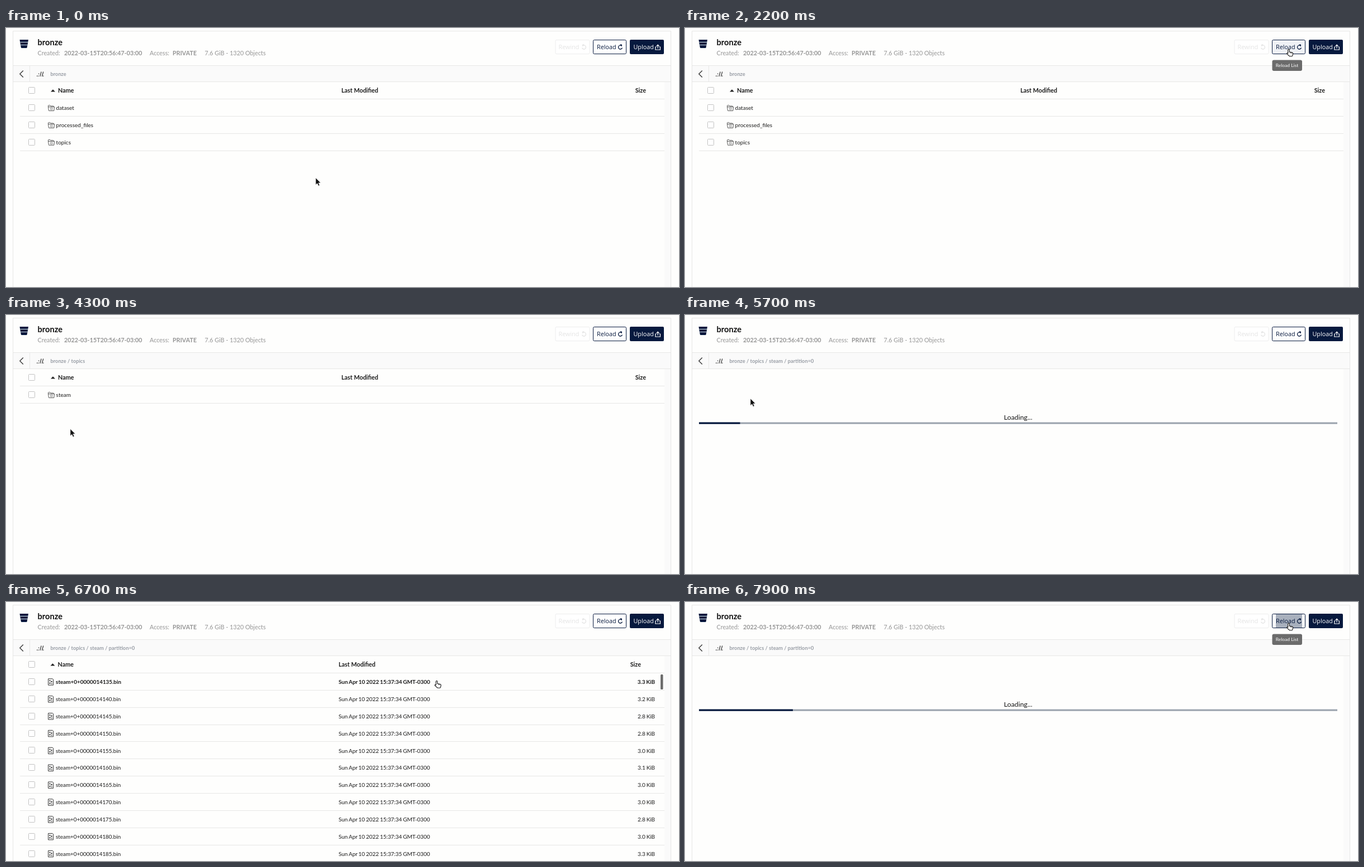
An HTML page for the animation above (8000 ms loop, 1204 by 465 pixels).

```html
<!DOCTYPE html>
<html lang="en">
<head>
<meta charset="utf-8">
<title>Bucket browser</title>
<style>
  html, body { margin: 0; width: 100%; height: 100%; overflow: hidden; background: #fefefd; }
  svg { display: block; width: 1204px; height: 465px; font-family: Lato, sans-serif; }
  .file { letter-spacing: -.008em; word-spacing: -.045em; }
</style>
</head>
<body>
<svg id="stage" viewBox="0 0 1204 465"></svg>
<script>
const LOOP = 8000, TICK = 100, PITCH = 30.86, LIST_TOP = 127.5;
const NAVY = '#07193e', INK = '#1c1c1c', GREY = '#969696', RULE = '#e7e7e6';

// Cursor path: time, x, y
const path = [
  [200, 554, 269], [400, 530.5, 264.5], [500, 530.5, 264.5], [600, 575, 250], [700, 730, 195],
  [800, 950, 120], [900, 1075, 66], [1000, 1075, 66], [1200, 1081, 34], [1300, 1080, 38],
  [2400, 1080, 38], [2700, 760, 100], [3000, 301, 173], [3100, 239.5, 177], [3500, 177, 190],
  [3600, 177, 190], [3800, 115, 204.5], [4300, 115, 204.5], [4800, 117, 150], [6400, 117, 150],
  [6500, 300, 167], [6600, 560, 160], [6700, 770.5, 141.5], [6800, 770.5, 141.5], [7200, 1065, 52],
  [7500, 1080, 38]
];

const root = ['dataset', 'processed_files', 'topics'];
const sizes = [3.3, 3.2, 2.8, 2.8, 3.0, 3.1, 3.0, 3.0, 2.8, 3.0, 3.3];
const files = sizes.map((size, i) => ({
  name: `steam+0+00000${14135 + 5 * i}.bin`,
  date: `Sun Apr 10 2022 15:37:${i < 10 ? 34 : 35} GMT-0300`,
  size: size.toFixed(1) + ' KiB'
}));
const folders = names => names.map(name => ({ name }));
const deep = 'bronze / topics / steam / partition=0';

// Start time, breadcrumb, rows (none while loading), moment loading began
const views = [
  [0, 'bronze', folders(root)],
  [2400, 'bronze', null, 2365],
  [2500, 'bronze', folders(root)],
  [4200, 'bronze / topics', folders(['steam'])],
  [5000, 'bronze / topics / steam', folders(['partition=0'])],
  [5700, deep, null, 5665],
  [5800, deep, files],
  [7900, deep, null, 7820]
];

// Baselines sit on whole pixels
const text = (x, y, size, str, fill = INK, extra = '') =>
  `<text x="${x}" y="${Math.round(y)}" font-size="${size}" fill="${fill}" ${extra}>${str}</text>`;
const rect = (x, y, w, h, fill, extra = '') =>
  `<rect x="${x}" y="${y}" width="${w}" height="${h}" fill="${fill}" ${extra}/>`;
const line = (d, stroke = RULE, width = 1, extra = '') =>
  `<path d="${d}" fill="none" stroke="${stroke}" stroke-width="${width}" ${extra}/>`;
const at = (x, y, content) => `<g transform="translate(${x} ${y})">${content}</g>`;
const BOLD = 'font-weight="700"', END = 'text-anchor="end"', MIDDLE = 'text-anchor="middle"';
const UI = 'font-family="Open Sans, sans-serif"';

const checkbox = y => rect(40.5, Math.floor(y) + .5, 11, 11, '#fff', 'stroke="#c2c2c2" rx="1"');
const turn = stroke => line('M3.4 1A3.5 3.5 0 1 1 1.5-3.2M-.4-4.3H2.3V-1.6', stroke, 1.3);
const folderIcon = line('M1.4 9.8L.5 3V1.3Q.5.5 1.3.5H3.8L5 1.8H9.6Q10.4 1.8 10.4 2.6V3.4M.5 3.4H11.6L10.8 10.3H1.4', '#444', .9) +
  line('M4.4 5.3H8.2V8.4H4.4ZM5.6 6.9H7', '#777', .7);
const fileIcon = line('M.6.6H8.3L9.6 1.9V12H.6Z', '#333', 1) +
  rect(2.4, 3, 2, 2, '#333') + rect(5.4, 4.6, 2.2, 2.2, '#333') + rect(2.4, 7.4, 2.2, 2.2, '#333') +
  rect(6, 8.6, 1.6, 1.6, '#333');
const arrow = '<path d="M0 0V12.6L2.9 9.9L4.9 14.4L7.1 13.5L5.1 9.1H9Z" fill="#111" stroke="#fff" stroke-width=".6"/>';
const hand = '<path d="M-1.3 8V1.3a1.3 1.3 0 0 1 2.6 0V5l5 1q1.5.4 1.4 2L7 11.4q-.3 1.3-1.4 1.3H1.5L-3 8.6q-.8-1 .2-1.5t1.5.9Z" fill="#fff" stroke="#111" stroke-width="1.1"/>' +
  line('M3.3 5.6V7.6M5.4 6V7.8', '#111', .8);

function cursorAt(t) {
  const i = path.findIndex(key => key[0] > t);
  if (i === 0) return path[0].slice(1);
  if (i < 0) return path[path.length - 1].slice(1);
  const [t0, x0, y0] = path[i - 1], [t1, x1, y1] = path[i], k = (t - t0) / (t1 - t0);
  return [x0 + (x1 - x0) * k, y0 + (y1 - y0) * k];
}

function header(crumbs, t, overReload) {
  const pressed = (t >= 2200 && t < 2500) || t === 7700;
  const fill = pressed ? '#eff1f5' : overReload ? '#fafbfc' : '#fff';
  return line('M12.5 465V5.5H1189.5V465') +
    rect(13, 68, 1176, 29, '#fafafa') + rect(1178, 97, 11, 368, '#fafafa') +
    line('M13 67.5H1189M13 96.5H1189M42.5 68V96') +
    `<path d="M24.5 21H40L37.6 35.2Q37.4 36 36.5 36H28Q27.1 36 26.9 35.2Z" fill="${NAVY}"/>` +
    line('M25.5 25.5H39M26.4 30.5H38.2', '#dfe3ea', 1.2) +
    text(56.5, 31, 14.6, 'bronze', '#111', BOLD) +
    text(56.5, 49, 10.8, 'Created:', GREY) +
    text(104, 49, 10.8, '2022-03-15T20:56:47-03:00', GREY, BOLD) +
    text(257, 49, 10.8, 'Access:', GREY) + text(298, 49, 10.8, 'PRIVATE', GREY, BOLD) +
    text(355.5, 49, 10.8, '7.6 GiB - 1320 Objects', GREY) +
    rect(983, 21.5, 61, 25, '#fff', 'stroke="#ededed" rx="2"') +
    text(988.5, 38, 10.8, 'Rewind', '#e4e4e4', UI) +
    at(1034, 34.5, `<g transform="scale(-1 1)">${turn('#e4e4e4')}</g>`) +
    rect(1050.5, 21.5, 59, 25, fill, `stroke="${NAVY}" rx="2"`) +
    (t >= 7800 ? rect(1057, 22, 47, 24, '#a8b0bd') : '') +
    text(1057, 38, 10.8, 'Reload', NAVY, UI) + at(1099, 34.5, turn(NAVY)) +
    rect(1116, 21, 61, 26, NAVY, 'rx="2"') + text(1122.5, 38, 10.8, 'Upload', '#fff', UI) +
    line('M1163.5 34H1161.8V39H1170.4V34H1168.7M1166.1 36.5V30.5M1163.6 32.8L1166.1 30.2L1168.6 32.8', '#fff', 1.2) +
    line('M30.8 76.5L24.8 82.5L30.8 88.5', '#333', 1.3) +
    line('M60.8 87L63.2 78.5M64.4 87L66.8 78.5M57.8 87V85.4M58.6 83V81.4M55.6 87V85.4M66.8 87V85.4', '#444', 1.3) +
    text(79.5, 86, 9.26, crumbs, '#989da5', BOLD);
}

function list(rows, hovered, scrollbar) {
  const isFiles = rows === files, dateX = scrollbar ? 595 : 600, shift = scrollbar ? .5 : 0;
  let out = checkbox(106) +
    `<path d="M${80 - shift} 114.6L${84 - shift} 110.2L${88 - shift} 114.6Z" fill="#222"/>` +
    text(93 - shift, 116, 10.8, 'Name', INK, BOLD) +
    text(dateX, 116, 10.8, 'Last Modified', INK, BOLD) +
    text(scrollbar ? 1136 : 1145, 116, 10.8, 'Size', INK, `${BOLD} ${END}`) +
    line(`M25 ${LIST_TOP}H1178`);
  rows.forEach((row, i) => {
    const top = LIST_TOP + i * PITCH, y = top + 19.6, weight = i === hovered ? BOLD : '';
    const style = isFiles ? `class="file" ${weight}` : weight;
    if (weight && !isFiles) out += rect(25, top, 1153, PITCH, '#f7f6f5');
    out += line(`M25 ${Math.round(top + PITCH - .5) + .5}H1178`) + checkbox(top + 10) +
      at(75, top + (isFiles ? 9.7 : 10.8), isFiles ? fileIcon : folderIcon) +
      text(89.6 - shift, y, 10.03, row.name, INK, style);
    if (isFiles) out += text(dateX, y, 10.03, row.date, INK, style) +
      text(scrollbar ? 1161 : 1169.5, y, 10.03, row.size, INK, `${style} ${END}`);
  });
  return out + (scrollbar ? rect(1171, 130, 4.5, 27, '#6c6c6c', 'rx="1.5"') : '');
}

const loading = elapsed => text(596, 188, 12.34, 'Loading...', '#111', MIDDLE) +
  rect(25, 192.6, 1142, 3.1, '#9ca4ae') + rect(25, 192.6, elapsed * 2.1, 3.1, NAVY);

function tooltip(t) {
  const start = t < 2500 ? 1200 : 7200;
  const opacity = Math.max(0, Math.min(1, (t - start) / 300));
  return `<g opacity="${opacity}">` + rect(1050.5, 57.5, 53.5, 19.5, '#6b6b6b', 'rx="3"') +
    text(1077, 70, 8.49, 'Reload List', '#fff', MIDDLE) + '</g>';
}

function scene(t) {
  const [, crumbs, rows, began] = views.filter(view => view[0] <= t).pop();
  const [x, y] = cursorAt(t);
  const overReload = x > 1050 && x < 1110 && y > 22 && y < 47;
  const row = Math.floor((y - LIST_TOP) / PITCH);
  const overRow = rows && row >= 0 && row < rows.length;
  return header(crumbs, t, overReload) +
    (rows ? list(rows, row, rows === files && t >= 6000) : loading(t - began)) +
    tooltip(t) + at(x, y, overReload || overRow ? hand : arrow);
}

const stage = document.getElementById('stage');
let shown = -1;
function play() {
  const t = Math.floor(performance.now() % LOOP / TICK) * TICK;
  if (t !== shown) stage.innerHTML = scene(shown = t);
  requestAnimationFrame(play);
}
play();
</script>
</body>
</html>
```
